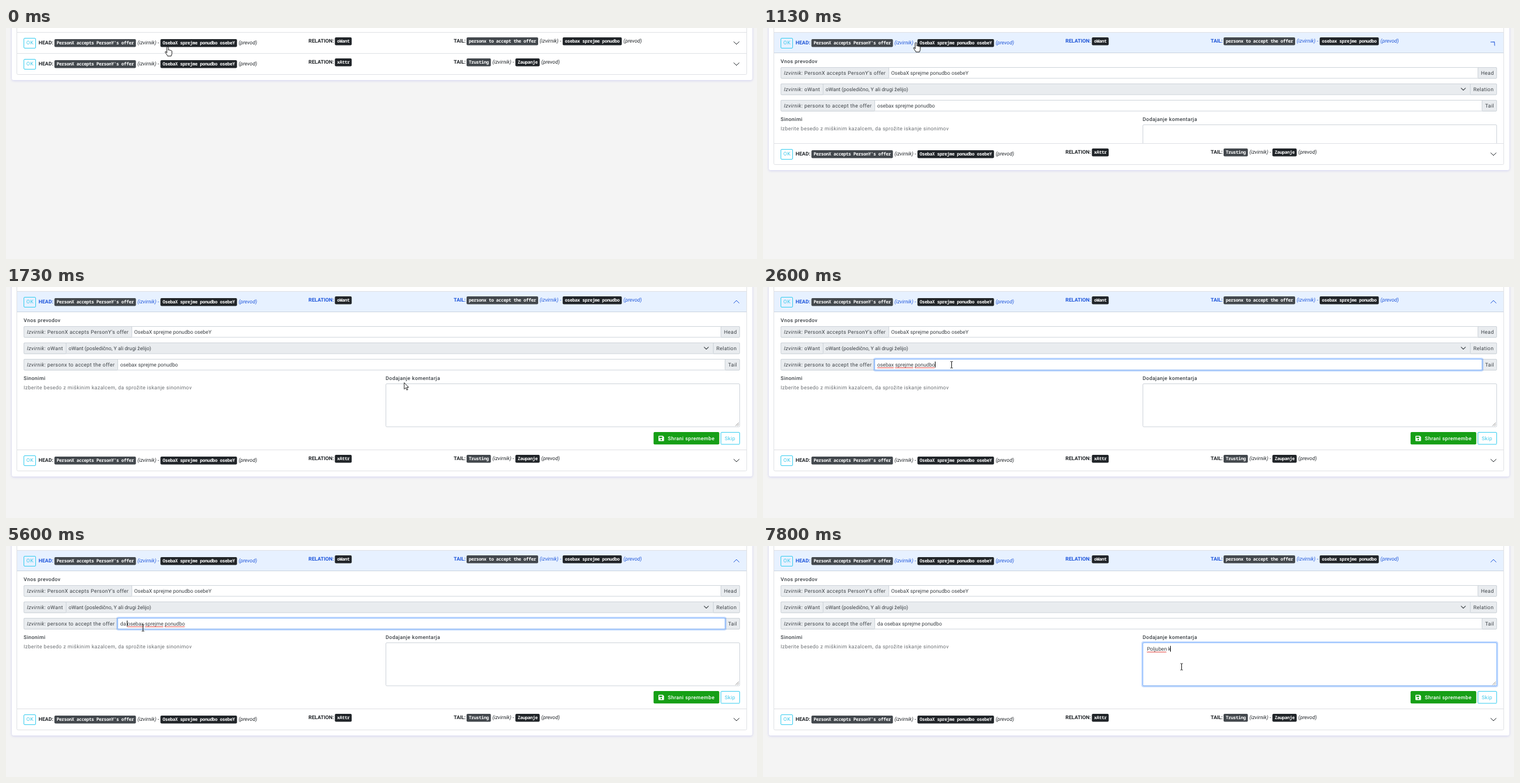
Recreate the animation shown at these times as an HTML page. Size 1280 by 395 pixels, loop 8000 ms.

```html
<!DOCTYPE html>
<html lang="sl">
<head>
<meta charset="utf-8">
<title>Vnos prevodov</title>
<style>
  html, body { margin: 0; width: 100%; height: 100%; overflow: hidden; background: #f4f4f4; }
  #card {
    position: absolute; left: 10px; top: -10px; width: 1262px; background: #fff;
    border-radius: 3px; box-shadow: 0 1px 4px rgba(90, 90, 230, .24);
  }
  #stage { position: absolute; left: 0; top: 0; width: 1280px; height: 395px; }
  text {
    font: 8.75px Roboto, "Open Sans", sans-serif; fill: currentColor;
    white-space: pre; text-rendering: geometricPrecision;
  }
  .bold { font-weight: 700; }
  .it { font-style: italic; }
  .mono { font: 600 7.66px "Noto Sans Mono", monospace; letter-spacing: -.356px; fill: #fff; }
  .wide { letter-spacing: .37px; }
  .label { font-weight: 500; letter-spacing: .37px; }
  .hint { letter-spacing: .37px; fill: #6a6e72; }
  .cyan { letter-spacing: .37px; fill: #3cc8ea; }
  .white { font-weight: 500; letter-spacing: .37px; fill: #fff; }
  .line { fill: none; stroke: #dfe1e5; }
  .box { fill: #fff; stroke: #ced4da; }
  .addon { fill: #e9ecef; stroke: #ced4da; }
  .outline { fill: none; stroke: #35cdf0; }
  .chevron { fill: none; stroke: currentColor; stroke-linecap: round; stroke-linejoin: round; }
  .squiggle { fill: none; stroke: #e0302a; stroke-width: .8; }
  .caret { stroke: #000; }
  .cursor { fill: #fff; stroke: #111; stroke-linejoin: round; }
</style>
</head>
<body>
<div id="card"></div>
<svg id="stage" viewBox="0 0 1280 395" color="#212529">
  <rect id="frame" class="line" x="18.5" y="-5.5" width="1244"/>
  <path class="line" d="M18 7.5H1263"/>
  <g id="tint">
    <rect x="19" y="8" width="1243" height="35" fill="#e7f1ff"/>
    <path d="M19 42.5H1262" stroke="#000" stroke-opacity=".125"/>
  </g>
  <g id="first"></g>
  <svg id="body" width="1280" color="#3b4045"></svg>
  <g id="second">
    <path class="line" style="fill:#fff" d="M18.5 43.5H1262.5V77.5q0 2-2 2H20.5q-2 0-2-2Z"/>
  </g>
  <g id="hand" class="cursor">
    <path transform="translate(-4.9 -.5)" d="M3.5 11V2a1.4 1.4 0 0 1 2.8 0V6.5a1.2 1.2 0 0 1 2.2.3 1.2 1.2 0 0 1 2 .5 1.1 1.1 0 0 1 1.7 1V12c0 2-1 3-1.3 4.5H4.8C4.3 14.5 2 12.5.8 10.2c-.6-1.2.8-1.8 1.6-1Z"/>
  </g>
  <path id="arrow" class="cursor" stroke-width=".9" d="M.4.4V11.4L3 9 4.8 13 6.5 12.2 4.8 8.3H8Z"/>
  <path id="beam" fill="none" stroke="#111" d="M-2-5.5H-.6L0-5 .6-5.5H2M0-5V5M-2 5.5H-.6L0 5 .6 5.5H2"/>
</svg>
<script>
const $ = id => document.getElementById(id);
const ctx = document.createElement('canvas').getContext('2d');
const LOOP = 8000, STEP = 1000 / 15;
const OPEN = 1000, FULL = 235, TAIL_FOCUS = 2460, NOTE_FOCUS = 5990;

// Markup helpers
const text = (x, y, s, cls = '') => `<text x="${x}" y="${y}" class="${cls}">${s}</text>`;
const rect = (x, y, w, h, cls, r = 1.5) =>
  `<rect x="${x}" y="${y}" width="${w}" height="${h}" rx="${r}" class="${cls}"/>`;

const chipWidth = s => s.length * 4.24 + 7.5;
const chip = (x, y, s, fill) =>
  `<rect x="${x}" y="${y - 9}" width="${chipWidth(s)}" height="13.5" rx="2" fill="${fill}"/>` +
  text(x + 3.75, y - .2, s, 'mono');

function pair(x, y, from, to) {
  const mid = x + chipWidth(from) + 2.5, next = mid + 39.3;
  return chip(x, y, from, '#43484d') + text(mid, y, '(izvirnik)', 'it') + text(mid + 34.6, y, '-') +
    chip(next, y, to, '#212529') + text(next + chipWidth(to) + 2.7, y, '(prevod)', 'it');
}

const row = (y, relation, from, to) =>
  rect(30.5, y - 10.5, 20, 17, 'outline') + text(34.8, y + .2, 'OK', 'cyan') +
  text(55.5, y, 'HEAD:', 'bold') +
  pair(82.5, y, "PersonX accepts PersonY's offer", 'OsebaX sprejme ponudbo osebeY') +
  text(515.6, y - 3, 'RELATION:', 'bold') + chip(560.5, y - 3, relation, '#212529') +
  text(763, y - 3, 'TAIL:', 'bold') + pair(785, y - 3, from, to) +
  `<path class="chevron" d="M-4.5-2 0 2.5 4.5-2" transform="translate(1245 ${y - 2.5})"/>`;

const field = (y, split, end, source, name, boxCls = 'box') =>
  rect(30.5, y, 1220, 18.5, boxCls) +
  rect(30.5, y, split - 30, 18.5, 'addon') +
  rect(end, y, 1250.5 - end, 18.5, 'addon') +
  text(35.8, y + 12.8, `<tspan class="it">Izvirnik:</tspan> ${source}`, 'wide') +
  text(end + 5.2, y + 12.8, name, 'wide');

const glow = (id, x, y, w, h) =>
  `<g id="${id}" fill="none">` +
  `<rect x="${x - 1.25}" y="${y - 1.25}" width="${w + 2.5}" height="${h + 2.5}" rx="2.5" stroke="#0d6efd" stroke-opacity=".25" stroke-width="2.5"/>` +
  `<rect x="${x}" y="${y}" width="${w}" height="${h}" rx="1.5" stroke="#86b7fe"/></g>`;

const editable = id =>
  `<text id="${id}Text"></text><path id="${id}Wave" class="squiggle"/><path id="${id}Caret" class="caret"/>`;

$('first').innerHTML = row(28, 'oWant', 'personx to accept the offer', 'osebax sprejme ponudbo');
$('second').innerHTML += row(64, 'xAttr', 'Trusting', 'Zaupanje');
$('body').innerHTML =
  text(30, 60, 'Vnos prevodov', 'label') +
  field(67.5, 214, 1218.5, "PersonX accepts PersonY's offer", 'Head') +
  text(218.6, 80, 'OsebaX sprejme ponudbo osebeY') +
  field(95.5, 102, 1205.5, 'oWant', 'Relation', 'addon') +
  text(106.8, 108, 'oWant (posledično, Y ali drugi želijo)') +
  '<path class="chevron" stroke-width="1.2" d="M1190 102.8l3.6 3.6 3.6-3.6"/>' +
  field(123.5, 190, 1225.5, 'personx to accept the offer', 'Tail') +
  glow('tailGlow', 190.5, 123.5, 1035, 18.5) + editable('tail') +
  text(30, 159, 'Sinonimi', 'label') +
  text(30, 175, 'Izberite besedo z miškinim kazalcem, da sprožite iskanje sinonimov', 'hint') +
  text(647, 159, 'Dodajanje komentarja', 'label') +
  rect(647.5, 165.5, 603, 73.5, 'box') +
  '<path d="M1243.5 237.5l5.5-5.5M1246.5 237.5l2.5-2.5" stroke="#777" stroke-width=".8"/>' +
  glow('noteGlow', 647.5, 165.5, 603, 73.5) + editable('note') +
  '<rect x="1103.7" y="248" width="112" height="21.3" rx="2" fill="#169f16"/>' +
  '<path fill="#fff" fill-rule="evenodd" d="M1113 254.5h6.5l2 2v6q0 1-1 1h-7.5q-1 0-1-1v-7q0-1 1-1ZM1113.5 256v2.2h5V256ZM1116.8 259.5a1.3 1.3 0 1 0 .01 0Z"/>' +
  text(1128, 262, 'Shrani spremembe', 'white') +
  rect(1218.5, 248.5, 32, 20.5, 'outline') + text(1225, 262, 'Skip', 'cyan');

// Timing helpers
const clamp = v => Math.min(1, Math.max(0, v));
const span = (t, start, length) => clamp((t - start) / length);

function bezier(x1, y1, x2, y2) {
  const at = (a, b, u) => 3 * a * u * (1 - u) ** 2 + 3 * b * u * u * (1 - u) + u ** 3;
  return x => {
    let lo = 0, hi = 1;
    for (let i = 0; i < 24; i++) {
      const mid = (lo + hi) / 2;
      if (at(x1, x2, mid) < x) lo = mid; else hi = mid;
    }
    return at(y1, y2, lo);
  };
}
const ease = bezier(.25, .1, .25, 1), easeInOut = bezier(.42, 0, .58, 1);

// Pointer path: time, x, y
const path = [
  [0, 275.5, 32], [200, 265.5, 26.5], [460, 265.5, 26.5], [530, 260.7, 25], [1260, 260.7, 25],
  [1730, 679, 164], [1800, 664, 148], [2130, 440, 101], [2460, 326, 132], [2600, 321.5, 133],
  [2670, 318, 133], [3000, 245, 124], [3330, 196, 131], [3400, 196, 131], [3530, 208, 131.5],
  [4540, 208, 131.5], [4730, 214, 131.5], [4800, 214, 131.5], [5000, 211, 137], [5130, 211, 137],
  [5270, 210, 136], [5540, 210, 136], [5670, 260, 145], [6000, 700, 203], [6070, 713, 206.5], [LOOP, 713, 206.5]
];

function pointer(t) {
  const i = path.findIndex(p => p[0] > t);
  const [t0, x0, y0] = path[i - 1], [t1, x1, y1] = path[i];
  const k = (t - t0) / (t1 - t0);
  return [x0 + (x1 - x0) * k, y0 + (y1 - y0) * k];
}

function pointerKind(x, y) {
  const inside = (l, top, r, b) => x > l && x < r && y > top && y < b;
  if (y < 43) return 'hand';
  const typing = inside(214, 67, 1218, 86) || inside(190, 123, 1225, 142) || inside(647, 165, 1250, 239);
  return typing ? 'beam' : 'arrow';
}

// Typed text: key times
const tailKeys = [3725, 3995, 4195];
const noteKeys = [6595, 6795, 6925, 7125, 7260, 7325, 7460, 7525, 7595, 7795];
const typed = (keys, t) => keys.filter(k => k <= t).length;
const blink = (t, since) => t >= since && Math.floor((t - since) / 530) % 2 === 0;

function width(s) {
  ctx.font = '100px Roboto, "Open Sans", sans-serif';
  return ctx.measureText(s).width * .0875;
}

function wave(s, x, y, wrong) {
  let d = '';
  for (const m of s.matchAll(/\S+/g)) {
    if (!wrong(m[0], m.index)) continue;
    const from = x + width(s.slice(0, m.index)), to = from + width(m[0]);
    d += `M${from} ${y}`;
    for (let px = from + 1, up = 1; px <= to; px++, up ^= 1) d += `L${px} ${y + up * 1.4}`;
  }
  return d;
}

function edit(id, s, x, y, caretAt, caretOn, wrong) {
  const el = $(id + 'Text');
  el.setAttribute('x', x);
  el.setAttribute('y', y);
  el.textContent = s;
  $(id + 'Wave').setAttribute('d', wave(s, x, y + 1.4, wrong));
  const cx = Math.floor(x + width(s.slice(0, caretAt))) + .5;
  $(id + 'Caret').setAttribute('d', caretOn ? `M${cx} ${y - 8.5}v10` : '');
}

function drawTail(t) {
  const n = typed(tailKeys, t), s = 'da '.slice(0, n) + 'osebax sprejme ponudbo';
  const focused = t >= TAIL_FOCUS && t < NOTE_FOCUS;
  const atStart = t >= 3260;
  const since = n ? tailKeys[n - 1] : atStart ? 3260 : 2590;
  const half = n === 1 || n === 2;
  edit('tail', s, 194.8, 136, atStart ? n : s.length, focused && blink(t, since),
    (word, i) => focused && word !== 'da' && !(half && i === 0));
}

function drawNote(t) {
  const n = typed(noteKeys, t), s = 'Poljuben k'.slice(0, n);
  const since = n ? noteKeys[n - 1] : NOTE_FOCUS + 75;
  edit('note', s, 654.4, 179.3, n, blink(t, since), (word, i) => i === 0 && t >= 7660);
}

const chevron = $('first').querySelector('.chevron');

function draw(now) {
  // The picture advances fifteen times a second
  const t = Math.floor((now % LOOP + 4) / STEP) * STEP;
  const shift = Math.round(FULL * ease(span(t, OPEN, 350)));
  const active = easeInOut(span(t, OPEN, 150));
  const turn = -180 * easeInOut(span(t, OPEN, 200));

  $('card').style.height = 99 + shift + 'px';
  $('frame').setAttribute('height', 50 + shift);
  $('body').setAttribute('height', 43 + shift);
  $('body').style.display = shift ? '' : 'none';
  $('second').setAttribute('transform', `translate(0 ${shift})`);
  $('tint').setAttribute('opacity', active);
  $('first').style.color = `color-mix(in srgb, #1f57dc ${active * 100}%, #212529)`;
  chevron.setAttribute('transform', `translate(1245 25.5) rotate(${turn})`);

  $('tailGlow').setAttribute('opacity', span(t, TAIL_FOCUS, 130) * (1 - span(t, NOTE_FOCUS, 130)));
  $('noteGlow').setAttribute('opacity', span(t, NOTE_FOCUS, 150));
  drawTail(t);
  drawNote(t);

  const [x, y] = pointer(t), kind = pointerKind(x, y);
  for (const id of ['hand', 'arrow', 'beam']) $(id).style.display = id === kind ? '' : 'none';
  const snap = kind === 'beam' ? Math.floor(x) + .5 : x;
  $(kind).setAttribute('transform', `translate(${snap} ${y})`);
}

const start = performance.now();
function tick() {
  draw(performance.now() - start);
  requestAnimationFrame(tick);
}
tick();
</script>
</body>
</html>
```
